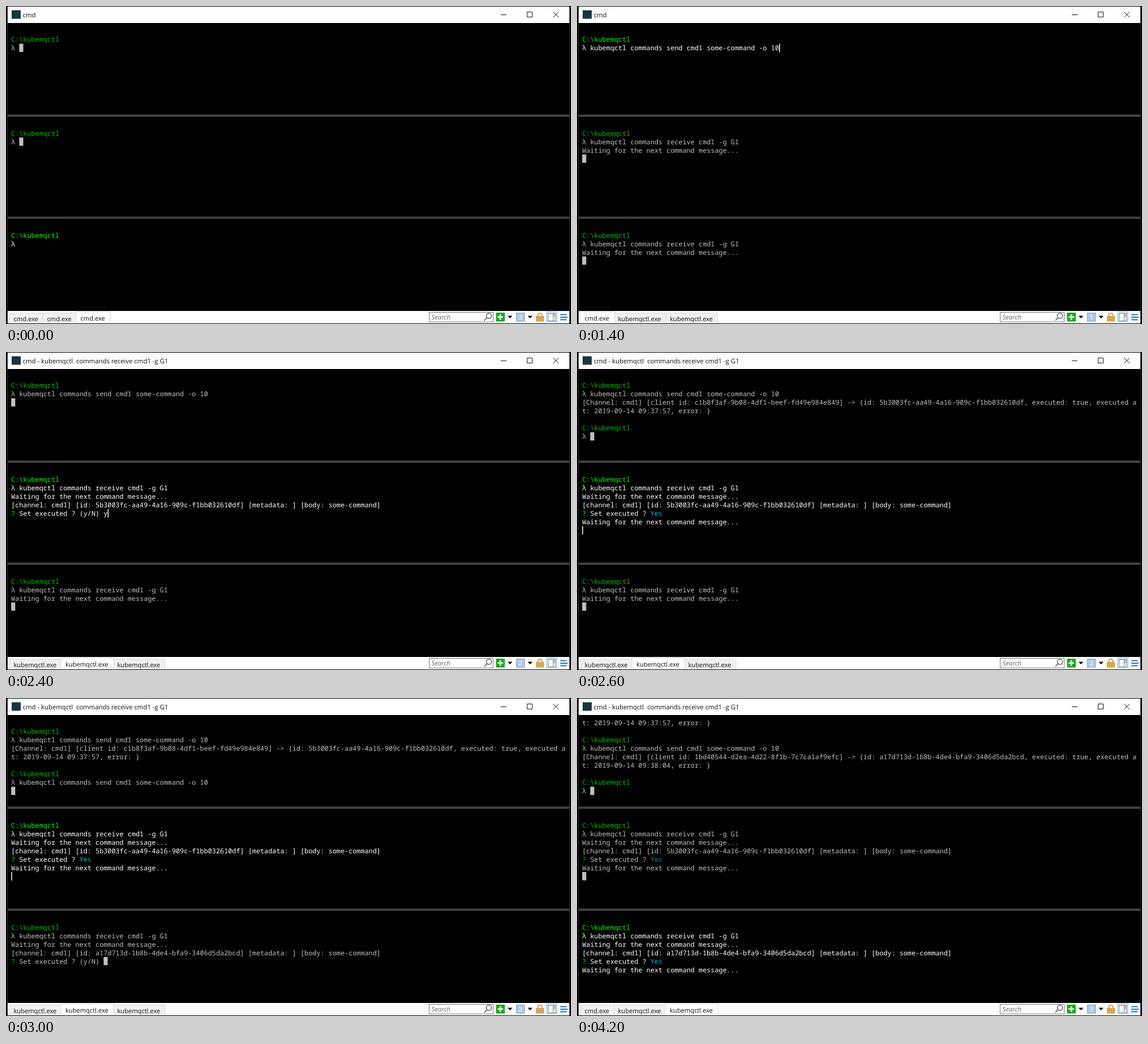
These frames come from a looping animation (998 by 561 pixels, 4400 ms). An HTML page:

```html
<!DOCTYPE html>
<html lang="en">
<head>
<meta charset="utf-8">
<title>Terminal</title>
<style>
  html, body { margin: 0; width: 100%; height: 100%; overflow: hidden; background: #000; }
  svg { display: block; width: 998px; height: 561px; }
  text { white-space: pre; text-rendering: geometricPrecision; font: 11.37px "Open Sans", sans-serif; }
  .mono text { font: 11.83px "Noto Sans Mono", monospace; }
  .tab { font-size: 11.13px; }
  .line { fill: none; stroke: #111; }
</style>
</head>
<body>
<svg viewBox="0 0 998 561">
  <path d="M2.5 1V560M995.5 1V560" stroke="#2b2b2b"/>
  <path d="M3 1H995V30H3ZM3 538H995V560H3Z" fill="#fff"/>
  <path d="M3 191.5H995V195.5H3ZM3 371.5H995V375.5H3Z" fill="#444"/>
  <rect x="10" y="7.5" width="16" height="15" fill="#17363d"/>
  <path class="line" d="M874 15.5H884M920.5 10.5H929.5V19.5H920.5ZM966.5 10.5L976 20M976 10.5L966.5 20"/>

  <!-- status bar tools -->
  <rect x="747.5" y="540.5" width="113" height="17" fill="#fff" stroke="#777"/>
  <text x="751.5" y="553" font-style="italic" fill="#666" style="font-style:italic">Search</text>
  <path class="line" style="stroke:#444;stroke-width:1.3" d="M849.5 550L845 555"/>
  <circle class="line" style="stroke:#444;stroke-width:1.3" cx="853" cy="546.5" r="4.6"/>
  <rect x="866" y="541.5" width="14.5" height="14.5" fill="#16b01c" stroke="#0b8a12" stroke-width=".8"/>
  <path d="M873.2 544V553.5M868.5 548.7H878" stroke="#fff" stroke-width="2.6"/>
  <path d="M886 546.5H894.5L890.2 551ZM921.5 546.5H930L925.7 551Z" fill="#000"/>
  <rect x="901.5" y="541.5" width="14.5" height="14.5" fill="#adc8e8" stroke="#7d9fc9"/>
  <path d="M939.5 548V545a3.5 3.2 0 0 1 7 0V548" fill="none" stroke="#c79a45" stroke-width="1.8"/>
  <rect x="936.5" y="547.5" width="13.5" height="8.5" fill="#e2b050" stroke="#bd8a32" stroke-width=".8"/>
  <path d="M938 550.5H948.5M938 553H948.5" stroke="#c79440"/>
  <rect x="954.5" y="539.5" width="19" height="18" fill="#cfe6f8" stroke="#a5d0f0"/>
  <rect x="957.5" y="542.5" width="13.5" height="13" fill="#f6f6f6" stroke="#8a8a8a"/>
  <path d="M966.5 543V555" stroke="#8a8a8a"/>
  <path d="M967 543H970.5V549H967Z" fill="#bbb"/>
  <path d="M979 544.5H990.5M979 549H992M979 553.5H990.5" stroke="#1c74c4" stroke-width="1.8"/>

  <g id="view"></g>
</svg>
<script>
const LOOP = 4400, CHAR = 7.1, ROW = 15;
const paneTop = [36.5, 202, 381.8];

const prompt = 'C:\\kubemqctl';
const recv = 'λ kubemqctl commands receive cmd1 -g G1';
const send = 'λ kubemqctl commands send cmd1 some-command -o 10';
const waiting = 'Waiting for the next command message...';
const id1 = '5b3003fc-aa49-4a16-909c-f1bb032610df';
const id2 = 'a17d713d-1b8b-4de4-bfa9-3406d5da2bcd';

const cmd = line => ['', prompt, line];
const idle = cmd('λ ');
const listen = [...cmd(recv), waiting, ''];
const message = id => [...cmd(recv), waiting,
  `[channel: cmd1] [id: ${id}] [metadata: ] [body: some-command]`];
const ask = (id, answer = '') => [...message(id), '? Set executed ? (y/N) ' + answer];
const done = id => [...message(id), '? Set executed ? Yes', waiting, ''];
const reply = (client, id, time) => [
  `[Channel: cmd1] [client id: ${client}] -> {id: ${id}, executed: true, executed a`,
  `t: 2019-09-14 ${time}, error: }`];

const sent = [...cmd(send), ''];
const first = [...cmd(send), ...reply('c1b8f3af-9b08-4df1-beef-fd49e984e849', id1, '09:37:57')];
const again = [...first, ...cmd(send)];
const last = [...again, ...reply('1bd40544-d2ea-4d22-8f1b-7c7ca1af9efc', id2, '09:38:04'), ...idle].slice(-9);

// start, active pane, caret shown, tab kinds, then the lines of the three panes
const steps = [
  [0, 2, 0, 'ccc', idle, idle, idle],
  [200, 2, 1, 'ccc', idle, idle, cmd('λ kubem')],
  [400, 2, 1, 'ccc', idle, idle, cmd(recv)],
  [600, 2, 0, 'ccc', idle, idle, cmd(recv)],
  [800, 2, 1, 'ccc', idle, idle, cmd(recv)],
  [1000, 0, 1, 'ckk', cmd(send), listen, listen],
  [1200, 0, 0, 'ckk', cmd(send), listen, listen],
  [1400, 0, 1, 'ckk', cmd(send), listen, listen],
  [1600, 0, 1, 'kkk', sent, ask(id1), listen],
  [1800, 0, 0, 'kkk', sent, ask(id1), listen],
  [2000, 0, 1, 'kkk', sent, ask(id1), listen],
  [2400, 1, 1, 'kkk', sent, ask(id1, 'y'), listen],
  [2600, 1, 1, 'kkk', [...first, ...idle], done(id1), listen],
  [2800, 0, 0, 'kkk', [...again, ''], done(id1), ask(id2)],
  [3000, 1, 1, 'kkk', [...again, ''], done(id1), ask(id2)],
  [3200, 2, 1, 'kkk', [...again, ''], done(id1), ask(id2)],
  [3400, 2, 1, 'kkk', [...again, ''], done(id1), ask(id2, 'y')],
  [3600, 2, 0, 'kkk', [...again, ''], done(id1), ask(id2, 'y')],
  [3800, 2, 1, 'kkk', last, done(id1), done(id2)],
  [4000, 2, 1, 'ckk', last, done(id1), done(id2)],
  [4200, 2, 0, 'ckk', last, done(id1), done(id2)],
];

const text = (x, y, fill, body, cls = '') =>
  `<text x="${x}" y="${y}" fill="${fill}" class="${cls}">${body}</text>`;
const rect = (x, y, w, h, fill, more = '') =>
  `<rect x="${x}" y="${y}" width="${w}" height="${h}" fill="${fill}" ${more}/>`;

function pane(lines, top, active, caret) {
  const [fg, green, cyan] = active ? ['#fff', '#0f0', '#00c0c0'] : ['#bfbfbf', '#00bf00', '#009090'];
  const body = lines.map((line, i) => text(9, top + i * ROW + 11.7, fg, line
    .replace(/^(C:.*|\?)/, `<tspan fill="${green}">$1</tspan>`)
    .replace(/Yes$/, `<tspan fill="${cyan}">Yes</tspan>`))).join('');
  const row = lines.length - 1;
  const x = 9.2 + lines[row].length * CHAR, y = top + row * ROW;
  if (!active) return body + rect(x, y, CHAR, 14.6, '#c0c0c0');
  return body + (caret ? rect(x, y, 1.5, ROW, '#fff') : '');
}

function tabs(kinds, active) {
  let x = 6.5, back = '', front = '';
  [...kinds].forEach((kind, i) => {
    const on = i === active, w = kind === 'c' ? 59 : 91.5;
    const tab = (on ? rect(x - 1, 539.5, w + 2, 21, '#fff', 'stroke="#d9d9d9"')
                    : rect(x, 541.5, w, 19, '#f0f0f0', 'stroke="#d9d9d9"')) +
      text(x + 7, on ? 555 : 556, '#111', (kind === 'c' ? 'cmd' : 'kubemqctl') + '.exe', 'tab');
    if (on) front = tab; else back += tab;
    x += w;
  });
  return back + front + rect(3, 560, 992, 1, '#000');
}

function render([, active, caret, kinds, ...panes]) {
  const job = active ? recv : send;
  const title = kinds[active] === 'c' ? 'cmd' : 'cmd - ' + job.slice(2).replace(' ', '  ');
  return text(29.5, 20, '#111', title) + tabs(kinds, active) +
    text(905.5, 553, '#fff', active + 1) +
    `<g class="mono">${panes.map((p, i) => pane(p, paneTop[i], i === active, caret)).join('')}</g>`;
}

const view = document.getElementById('view');
let shown;
function tick() {
  const t = performance.now() % LOOP;
  const step = steps.filter(s => s[0] <= t).pop();
  if (step !== shown) view.innerHTML = render(shown = step);
  requestAnimationFrame(tick);
}
tick();
</script>
</body>
</html>
```
